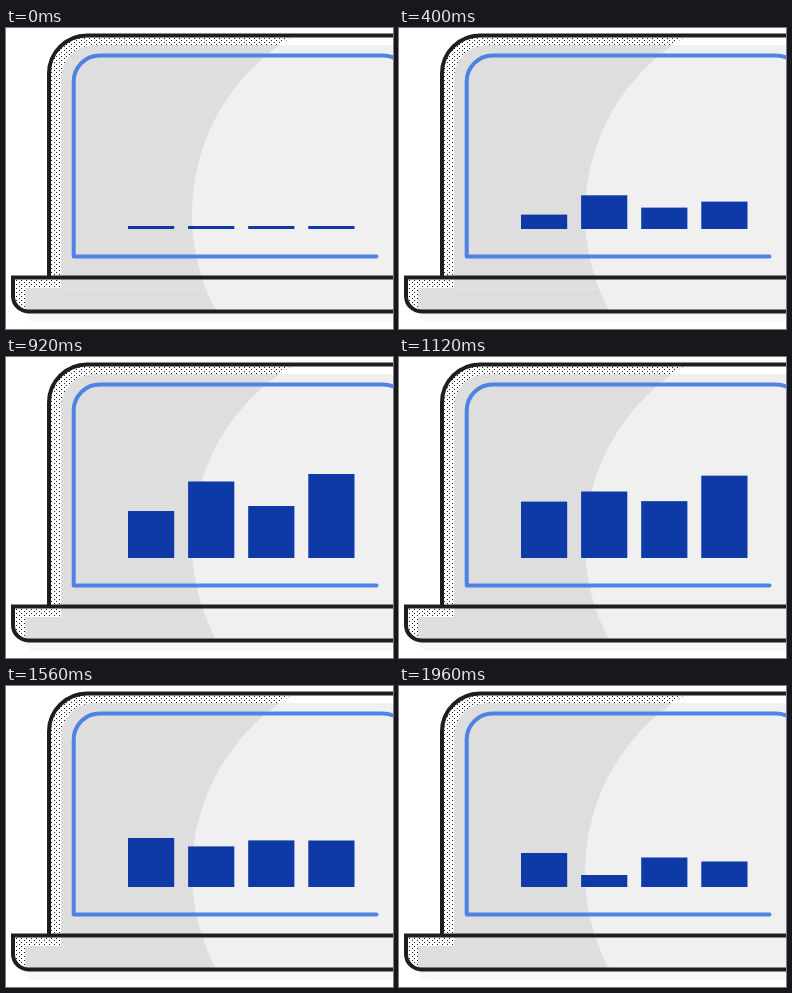
These frames come from a looping animation (387x301 px, 2000 ms). An HTML page:

```html
<!DOCTYPE html>
<html lang="en">
<head>
<meta charset="utf-8">
<title>Laptop bar chart</title>
<style>
  html, body { margin: 0; width: 100%; height: 100%; overflow: hidden; background: #fff; }
  svg { display: block; }
</style>
</head>
<body>
<svg width="387" height="301" viewBox="0 0 387 301" fill="none">
  <defs>
    <pattern id="dots" width="5" height="4" patternUnits="userSpaceOnUse">
      <path d="M0 0h1v1h-1zM3 2h1v1h-1z" fill="#1e1e1e" shape-rendering="crispEdges"/>
    </pattern>
    <path id="lid" d="M43 249.5V45.5A38 38 0 0 1 81 7.5H400V249.5"/>
    <path id="base" d="M400 249.5H7V268A15.5 15.5 0 0 0 22.5 283.5H400"/>
    <path id="panel" d="M55 260V50A33 33 0 0 1 88 17H387V301H19V260Z"/>
    <circle id="glare" cx="393" cy="186" r="207"/>
    <clipPath id="body"><use href="#lid"/><use href="#base"/></clipPath>
    <clipPath id="inside"><use href="#panel"/></clipPath>
  </defs>

  <path d="M19 284A10 10 0 0 0 29 294H387V284Z" fill="#f7f7f7"/>
  <g clip-path="url(#body)">
    <path d="M0 0H387V301H0Z" fill="url(#dots)"/>
    <use href="#glare" fill="#fff"/>
    <use href="#panel" fill="#dedede"/>
    <path d="M57 260.5H387" stroke="#f4f4f4" stroke-dasharray="1 3"/>
    <use href="#glare" fill="#f0f0f0" clip-path="url(#inside)"/>
  </g>
  <g stroke="#1e1e1e" stroke-width="4">
    <use href="#lid"/>
    <use href="#base"/>
  </g>
  <path d="M370.5 228.5H67.7V53.5A26 26 0 0 1 93.7 27.5H377A26 26 0 0 1 403 53.5"
        stroke="#3b76e6" stroke-opacity=".88" stroke-width="4"
        stroke-linecap="round" stroke-linejoin="round"/>
  <g id="bars" fill="#0d3aa6"></g>
</svg>
<script>
  const LOOP = 2000, STEP = 40, FLOOR = 201;
  const times = [0, 400, 720, 920, 1280, 1560, 1960];
  const heights = [
    [3, 14.4, 34, 47, 59, 49, 34],
    [3, 33.7, 63.5, 76.5, 53.5, 40.6, 12],
    [3, 21.4, 39, 52, 56, 46.6, 29.5],
    [3, 27.4, 58.5, 84, 71, 46.5, 25.5]
  ];

  // Smooth curve through the key heights, with parabolic tangents.
  function curve(h) {
    const n = times.length - 1;
    const gap = i => times[i + 1] - times[i];
    const rate = i => (h[i + 1] - h[i]) / gap(i);
    const mid = i => (rate(i - 1) * gap(i) + rate(i) * gap(i - 1)) / (gap(i - 1) + gap(i));
    const slope = i => i === 0 ? 2 * rate(0) - mid(1)
                     : i === n ? 2 * rate(n - 1) - mid(n - 1)
                     : mid(i);
    return t => {
      let i = 0;
      while (i < n - 1 && t >= times[i + 1]) i++;
      const d = gap(i), u = (t - times[i]) / d, v = 1 - u;
      return v * v * ((1 + 2 * u) * h[i] + u * d * slope(i)) +
             u * u * ((1 + 2 * v) * h[i + 1] - v * d * slope(i + 1));
    };
  }

  const bars = heights.map((h, i) => {
    const rect = document.createElementNS("http://www.w3.org/2000/svg", "rect");
    rect.setAttribute("x", 122 + 60.1 * i);
    rect.setAttribute("width", 46.2);
    document.getElementById("bars").append(rect);
    return { rect, height: curve(h) };
  });

  function draw(now) {
    const t = Math.floor(now % LOOP / STEP) * STEP;
    for (const { rect, height } of bars) {
      const h = height(t);
      rect.setAttribute("y", FLOOR - h);
      rect.setAttribute("height", h);
    }
  }

  const start = performance.now();
  function tick() {
    draw(performance.now() - start);
    requestAnimationFrame(tick);
  }
  tick();
</script>
</body>
</html>
```
